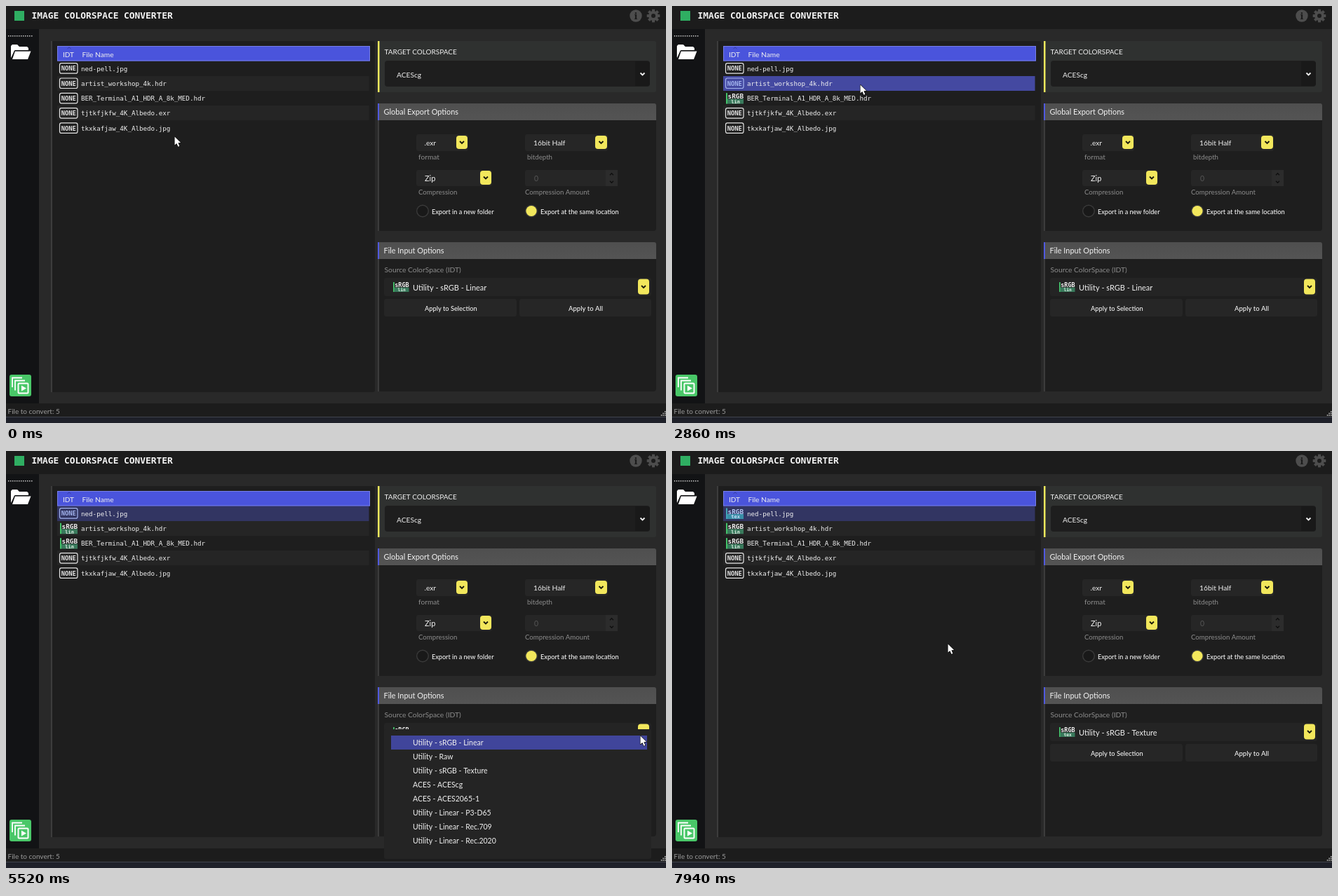
Write an HTML page with a canvas that moves like this. It is 941 px wide and 595 px high and loops after 8 s.

```html
<!DOCTYPE html>
<html lang="en">
<head>
<meta charset="utf-8">
<title>Image Colorspace Converter</title>
<style>
  html, body { margin: 0; width: 100%; height: 100%; overflow: hidden; background: #292929; }
  canvas { display: block; }
</style>
</head>
<body>
<canvas id="stage" width="941" height="595"></canvas>
<script>
const ctx = document.getElementById('stage').getContext('2d');
const LOOP = 8000;
const SANS = 'Lato, "Open Sans", sans-serif';
const MONO = '"DejaVu Sans Mono", "Noto Sans Mono", monospace';
const DARK = '#1e1e1e', FIELD = '#262626', YELLOW = '#f2e75c', BLUE = '#4a54dc';
const FILES = ['ned-pell.jpg', 'artist_workshop_4k.hdr', 'BER_Terminal_A1_HDR_A_8k_MED.hdr',
  'tjtkfjkfw_4K_Albedo.exr', 'tkxkafjaw_4K_Albedo.jpg'];
const SPACES = ['Utility - sRGB - Linear', 'Utility - Raw', 'Utility - sRGB - Texture', 'ACES - ACEScg',
  'ACES - ACES2065-1', 'Utility - Linear - P3-D65', 'Utility - Linear - Rec.709', 'Utility - Linear - Rec.2020'];
const ROW_Y = 78.5, ROW_H = 21.3;

// Pointer legs: first step, last step, number of steps, destination
const START = [240, 186];
const LEGS = [
  [660, 980, 4, 273, 127],
  [1320, 1970, 7, 659, 429],
  [2310, 2750, 5, 268, 112],
  [3190, 3630, 5, 641, 438],
  [3740, 3740, 1, 640, 432],
  [3860, 3860, 1, 570, 364],
  [3980, 4530, 6, 251, 94],
  [4860, 5410, 6, 904, 406],
  [5750, 6070, 4, 665, 448],
  [6630, 6850, 3, 674, 580],
  [6950, 7270, 4, 687, 421],
  [7390, 7490, 2, 687, 432],
  [7830, 7940, 2, 393, 275]
];

function pointerAt(t) {
  let [x, y] = START;
  for (const [t0, t1, n, tx, ty] of LEGS) {
    if (t < t0) break;
    const gap = n > 1 ? (t1 - t0) / (n - 1) : 1;
    const p = Math.min(n, Math.floor((t - t0 + 9) / gap) + 1) / n;
    const e = p * p * (3 - 2 * p);
    x += (tx - x) * e;
    y += (ty - y) * e;
  }
  return { x: Math.round(x), y: Math.round(y) };
}

function stateAt(t) {
  const pointer = pointerAt(t);
  return {
    pointer,
    selected: t < 1210 ? -1 : t < 2860 ? 2 : t < 4640 ? 1 : 0,
    tags: [t >= 7720 ? 'tex' : '', t >= 3860 ? 'lin' : '', t >= 2310 ? 'lin' : '', '', ''],
    space: t >= 6520 ? 2 : 0,
    popup: t >= 5520 && t < 6520
  };
}

const inside = (p, x, y, w, h) => p.x >= x && p.x < x + w && p.y >= y && p.y < y + h;

function rect(x, y, w, h, color) {
  ctx.fillStyle = color;
  ctx.fillRect(x, y, w, h);
}

function round(x, y, w, h, r, fill, stroke, line = 1) {
  ctx.beginPath();
  ctx.roundRect(x, y, w, h, r);
  if (fill) { ctx.fillStyle = fill; ctx.fill(); }
  if (stroke) { ctx.strokeStyle = stroke; ctx.lineWidth = line; ctx.stroke(); }
}

function disc(x, y, r, color) {
  ctx.fillStyle = color;
  ctx.beginPath();
  ctx.arc(x, y, r, 0, Math.PI * 2);
  ctx.fill();
}

function poly(points, fill, stroke, line = 1) {
  ctx.beginPath();
  points.forEach(([x, y], i) => i ? ctx.lineTo(x, y) : ctx.moveTo(x, y));
  if (fill) { ctx.closePath(); ctx.fillStyle = fill; ctx.fill(); }
  if (stroke) { ctx.strokeStyle = stroke; ctx.lineWidth = line; ctx.stroke(); }
}

function text(str, x, y, size, color = '#f0f0f0', font = SANS, weight = 400) {
  ctx.font = `${weight} ${size}px ${font}`;
  ctx.fillStyle = color;
  ctx.fillText(str, x, y);
}

function chevron(x, y, color, w = 3, line = 1.8, dir = 1) {
  poly([[x - w, y - dir * w / 2], [x, y + dir * w / 2], [x + w, y - dir * w / 2]], null, color, line);
}

function arrowButton(x, y, w, h) {
  round(x, y, w, h, 4, YELLOW);
  chevron(x + w / 2, y + h / 2, '#17170c');
}

function sectionHeader(y, label) {
  const g = ctx.createLinearGradient(0, y, 0, y + 24);
  g.addColorStop(0, '#4f4f4f');
  g.addColorStop(1, '#545454');
  round(530, y, 397, 24, [0, 3, 0, 0], g);
  rect(530, y, 2, 24, '#5059e0');
  text(label, 538.5, y + 16, 10.9);
}

function sectionBody(y, h) {
  round(530, y, 397, h, [0, 0, 4, 4], DARK);
  rect(530, y, 2, h, '#3c3c3c');
}

function noneTag(x, y, tint) {
  const color = tint ? '#a3b4ee' : '#e4e4e4';
  round(x, y, 25.5, 14.5, 2.5, null, color, 1.2);
  text('NONE', x + 2.2, y + 10.6, 8.8, color, MONO, 700);
}

function spaceTag(x, y, scale, word, tint) {
  ctx.save();
  ctx.translate(x, y);
  ctx.scale(scale, scale);
  rect(0, 0, 2, 15.5, tint ? '#42a7b8' : '#43c36a');
  rect(2, 8.5, 23, 7, tint ? '#3a8fa8' : '#397a5c');
  text('sRGB', 2.5, 8.2, 9.4, tint ? '#b5c9f5' : '#f2f2f2', MONO, 700);
  text(word, 7.2, 14.7, 7, tint ? '#c9dcfa' : '#e2f1e8', MONO, 700);
  ctx.restore();
}

function drawTitleBar() {
  rect(0, 0, 941, 33, '#1c1c1c');
  rect(12, 7, 14, 14, '#2fae62');
  text('IMAGE COLORSPACE CONVERTER', 36.5, 18.3, 12.87, '#f5f5f5', MONO, 700);
  disc(898, 14, 8.7, '#4d4d4d');
  text('i', 895.6, 18.8, 13, '#1c1c1c', '"DejaVu Serif", "Noto Serif", serif', 700);
  for (let i = 0; i < 8; i++) {
    ctx.save();
    ctx.translate(923, 14);
    ctx.rotate(i * Math.PI / 4);
    rect(-2, -9.3, 4, 5, '#4d4d4d');
    ctx.restore();
  }
  disc(923, 14, 6.9, '#4d4d4d');
  disc(923, 14, 3, '#1c1c1c');
}

function drawSidebar() {
  rect(0, 33, 47, 534, '#121315');
  for (let x = 3; x < 39; x += 3) rect(x, 42, 1.5, 1.5, '#c8c8c8');
  poly([[7, 74], [7, 57], [9, 55], [16, 55], [19, 58], [30, 58], [32, 60], [32, 63], [13, 63]], '#fff');
  poly([[13, 64.5], [35.5, 64.5], [31, 76], [9, 76]], '#fff');
  poly([[8, 74], [12.2, 63.8], [33, 63.8]], null, '#121315', 1);
  round(5, 526, 31, 31, 3, '#49c768');
  poly([[9, 544], [9, 530.5], [23, 530.5]], null, '#fff', 1.8);
  poly([[13, 548.5], [13, 534.5], [27, 534.5]], null, '#fff', 1.8);
  round(17.5, 538.5, 14, 14, 1, null, '#fff', 1.9);
  poly([[22, 541.5], [29, 545.5], [22, 549.5]], '#fff');
}

function drawStatus() {
  rect(0, 567, 941, 19, '#1c1c1c');
  rect(0, 586, 941, 9, '#1e2029');
  rect(0, 586, 941, 1, '#41444d');
  text('File to convert: 5', 2.5, 582, 10, '#9b9b9b');
  for (let r = 0; r < 3; r++)
    for (let c = 0; c <= r; c++) rect(939 - c * 2.6, 578 + r * 2.6, 1.5, 1.5, '#d0d0d0');
}

function drawList(s) {
  round(64, 50, 462, 501, 3, DARK);
  rect(64, 50, 2, 501, '#3c3c3c');
  rect(73, 57, 446, 21.5, BLUE);
  ctx.strokeStyle = '#777fe9';
  ctx.lineWidth = 1;
  ctx.strokeRect(73.5, 57.5, 445, 20.5);
  chevron(90, 60, '#353c9d', 2.5, 1, -1);
  text('IDT', 81, 72.5, 10);
  text('File Name', 108.5, 72.5, 10.2);
  FILES.forEach((name, i) => {
    const y = ROW_Y + i * ROW_H, odd = i % 2;
    const on = s.selected === i;
    const hot = on && inside(s.pointer, 73, y, 445, ROW_H);
    if (odd) rect(73, Math.round(y), 444.5, 21, '#252525');
    if (on) {
      const fill = hot ? (odd ? '#4449a1' : '#40459b') : (odd ? '#383b6a' : '#323562');
      rect(73, Math.round(y), 444.5, 21, fill);
    }
    if (s.tags[i]) spaceTag(77, y + 3, 1, s.tags[i], on);
    else noneTag(76.5, y + 3.2, on);
    text(name, 107, y + 14, 9.2, '#f0f0f0', MONO);
  });
}

function drawTarget() {
  round(530, 50, 397, 73, [0, 3, 3, 0], '#2f3130');
  rect(530, 50, 2.5, 73, YELLOW);
  text('TARGET COLORSPACE', 539.5, 69, 10);
  round(540, 78, 378, 37, 4, DARK);
  round(897, 79, 21, 35, [0, 4, 4, 0], '#191919');
  text('ACEScg', 557, 101.5, 10.2);
  chevron(907.5, 97, '#f0f0f0');
}

function drawExport() {
  sectionBody(163, 158);
  sectionHeader(139, 'Global Export Options');
  const grey = '#8d8d8d';
  round(585, 183, 74, 24, 3, FIELD);
  text('.exr', 596.5, 199, 10.2);
  arrowButton(642, 185, 16, 19);
  text('format', 588, 218.5, 10.2, grey);
  round(740, 183, 118, 24, 3, FIELD);
  text('16bit Half', 752, 199, 10.3);
  arrowButton(840, 185, 17, 19);
  text('bitdepth', 743, 218.5, 9.7, grey);
  round(585, 234, 108, 23, 3, FIELD);
  text('Zip', 597, 250, 11);
  arrowButton(676, 235, 16, 20);
  text('Compression', 588, 269, 9.7, grey);
  round(740, 234, 132, 23, 3, FIELD);
  rect(855, 234, 17, 23, '#2c2c2c');
  chevron(863.5, 240, '#0f0f0f', 2.5, 1.4, -1);
  chevron(863.5, 251, '#0f0f0f', 2.5, 1.4);
  text('0', 753, 250, 10.5, '#565656');
  text('Compression Amount', 740, 269, 9.7, grey);
  disc(594, 292.5, 9, '#3a3a3a');
  disc(594, 292.5, 7.6, '#191919');
  text('Export in a new folder', 607, 296.5, 9.1, '#f5f5f5', SANS, 500);
  disc(749, 292.5, 9, '#383838');
  disc(749, 292.5, 7.6, YELLOW);
  text('Export at the same location', 762, 296.5, 9.25, '#f5f5f5', SANS, 500);
}

function drawInput(s) {
  sectionBody(360, 190);
  sectionHeader(337, 'File Input Options');
  text('Source ColorSpace (IDT)', 539.5, 380, 10.3, '#8d8d8d');
  round(539, 388, 381, 26, 3, '#242424');
  spaceTag(552, 394, 0.9, s.space ? 'tex' : 'lin');
  text(SPACES[s.space], 580, 405.5, 11);
  arrowButton(901, 389.5, 16, 22);
  const hot = !s.popup && inside(s.pointer, 539, 418, 189, 25);
  if (hot) round(540, 419, 187, 23.5, 3, '#393c70', '#5d68ee', 1.8);
  else round(539, 418, 189, 25, 3, FIELD);
  text('Apply to Selection', 597, 435, 9.25, '#f5f5f5', SANS, 500);
  round(732, 418, 188, 25, 3, FIELD);
  text('Apply to All', 802, 435, 9.5, '#f5f5f5', SANS, 500);
}

function drawPopup(s) {
  round(539, 397, 381, 185, 3, '#242424');
  SPACES.forEach((name, i) => {
    const y = 406 + i * 20;
    if (inside(s.pointer, 549, y, 365, 20)) rect(549, y, 365, 20, '#40459b');
    text(name, 580, y + 13.5, 10.5);
  });
}

function drawPointer({ x, y }) {
  ctx.save();
  ctx.translate(x + 0.5, y + 0.5);
  ctx.lineJoin = 'round';
  const shape = [[0, 0], [0, 12], [2.8, 9.5], [4.9, 14.3], [6.9, 13.4], [4.9, 8.8], [8.6, 8.6], [0, 0]];
  poly(shape, null, '#000', 1.2);
  poly(shape, '#fff');
  ctx.restore();
}

function render(t) {
  const s = stateAt(t);
  rect(0, 0, 941, 595, '#292929');
  drawTitleBar();
  drawSidebar();
  drawStatus();
  drawList(s);
  drawTarget();
  drawExport();
  drawInput(s);
  if (s.popup) drawPopup(s);
  drawPointer(s.pointer);
}

function tick() {
  render(performance.now() % LOOP);
  requestAnimationFrame(tick);
}
tick();
</script>
</body>
</html>
```
